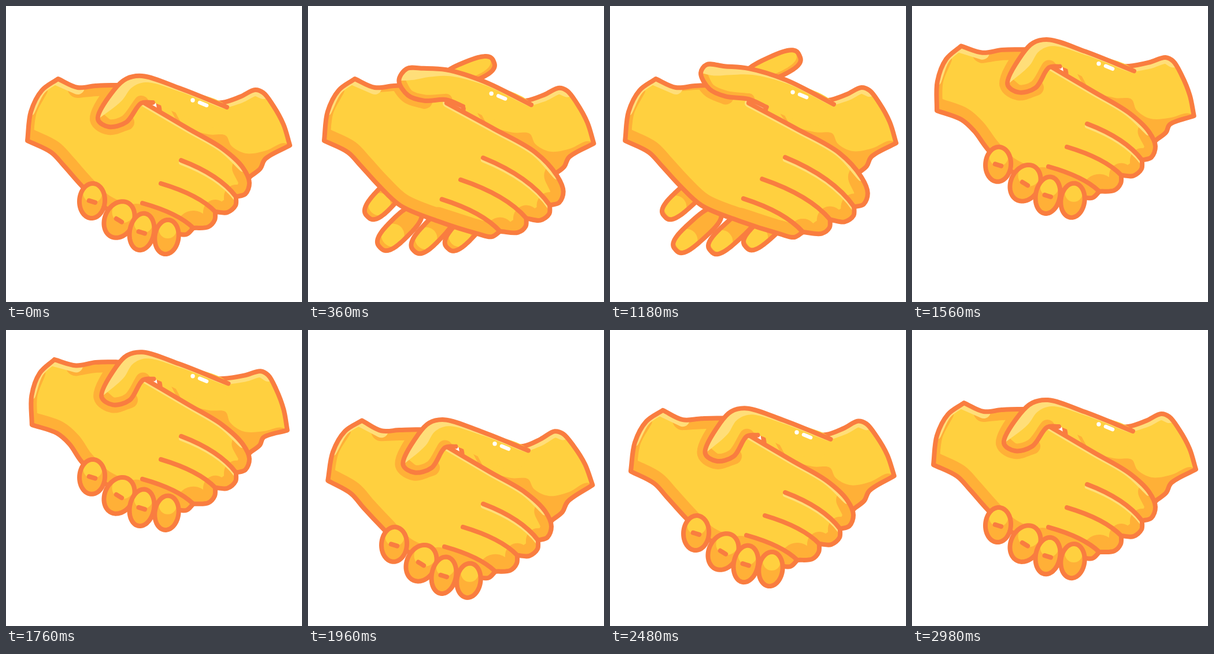
These frames come from a looping animation (512x512 px, 3 s). An HTML page with a canvas:

```html
<!DOCTYPE html>
<html lang="en">
<head>
<meta charset="utf-8">
<title>Handshake</title>
<style>
html, body { margin: 0; width: 100%; height: 100%; overflow: hidden; background: #fff; }
canvas { display: block; width: 100vw; height: 100vh; }
</style>
</head>
<body>
<canvas id="stage" width="512" height="512"></canvas>
<script>
const ctx = document.getElementById('stage').getContext('2d');
const LOOP = 3000;
const LINE = '#f97d40', FILL = '#ffd03f', SHADE = '#ffb037', PALE = '#ffde79';

// "x,y" pairs; "!" marks a corner.
const points = text => text.trim().split(/\s+/).map(p => {
  const [x, y] = p.replace('!', '').split(',').map(Number);
  return { x, y, corner: p.includes('!') };
});

// Outlines of the gripping hands; slideLeft and slideRight open them.
const LEFT = points(`90,126! 62,146 43,183 37,233! 78,253 100,276 130,310 165,345 225,372
  290,392 312,395 324,384! 350,382 361,370 362,356! 383,357 397,345 398,330! 414,325 421,306
  410,280 375,247 315,212 240,168! 248,142 188,137 155,138 124,141`);
const RIGHT = points(`264,171 265,184 244,202! 400,310 425,293 440,281 448,265 491,241!
  480,205 462,172 445,150 431,145 405,157 374,167 340,165 260,140`);
const PALM = points(`275,150 300,203 350,222 380,224 390,242 415,255 450,250 480,237
  500,245! 440,310 350,270`);

// Each row is one point when gripped, half open and open.
const THUMB = [
  '254,167 271,175 283,137',
  '234,168 240,161 262,123',
  '208,201 200,156 222,102',
  '178,209 172,143 203,84',
  '159,196 157,115 193,60',
  '187,145 167,101 205,36',
  '208,126 198,104 225,48',
  '235,121 240,108 255,69',
  '300,142 305,128 320,89',
  '382,175 387,170 403,134'
].map(points);
const BACK_THUMB = ['290,150 328,85 281,17', '230,150 235,128 242,105'].map(points);
const GLINT = points('323,163 316,149 324,106');

// Gripped tip and base, then the tip when stretched out.
const FINGERS = [
  '147,367 151,307 94,364',
  '182,399 210,340 113,422',
  '229,422 241,359 174,424',
  '274,429 282,370 235,417'
].map(points);
const CREASES = points('303,267 268,307 236,341');
const NOTCHES = [17, 14, 11];

const clamp = v => Math.max(0, Math.min(1, v));
const smooth = v => { v = clamp(v); return v * v * (3 - 2 * v); };
const wave = v => (1 - Math.cos(Math.PI * clamp(v))) / 2;
const move = (p, dx, dy) => ({ ...p, x: p.x + dx, y: p.y + dy });

function track(keys, t) {
  let i = 1;
  while (i < keys.length - 1 && t > keys[i][0]) i++;
  const [t0, a] = keys[i - 1], [t1, b] = keys[i];
  return a + (b - a) * wave((t - t0) / (t1 - t0));
}
const OPEN = [[0, 0], [170, 0], [600, 2], [1000, 2], [1360, 0], [LOOP, 0]];
const LIFT = [[0, 0], [160, 17], [360, 0], [1180, 0], [1350, 21], [1690, -102],
  [1985, 36], [2250, -103], [2475, 14], [LOOP, 0]];
const SQUEEZE = [[0, 0], [1300, 0], [1560, 1], [2480, 1], [LOOP, 0]];

let open, reach, spread, lift, bend, squeeze;

const mix = (a, b, c) => open < 1 ? a + (b - a) * open : b + (c - b) * (open - 1);
const blend = (a, b, c) => ({ x: mix(a.x, b.x, c.x), y: mix(a.y, b.y, c.y) });

function turn(p, cx, cy, angle) {
  const s = Math.sin(angle), c = Math.cos(angle), x = p.x - cx, y = p.y - cy;
  return { ...p, x: cx + x * c - y * s, y: cy + x * s + y * c };
}

// Shake: wrists bend against the lift, the grip presses in.
function flex(p) {
  const { x, y } = p;
  const left = smooth((190 - x) / 90) * smooth((310 - y) / 50);
  const right = smooth((x - 350) / 70) * smooth((290 - y) / 60);
  const press = squeeze * Math.exp(-((x - 185) ** 2 + (y - 195) ** 2) / 3600);
  let q = turn(p, 150, 180, -0.1 * bend * left);
  q = turn(q, 370, 215, 0.11 * bend * right);
  return move(q, 7 * press, 4 * press + lift);
}

function slideLeft(p) {
  const { x, y } = p;
  const out = smooth((x - 260) / 150), low = smooth((y - 200) / 100);
  const web = smooth((x - 125) / 45) * smooth((165 - y) / 20);
  const little = smooth((y - 340) / 50) * smooth((370 - x) / 60);
  const dx = reach * (25 * out - 11 * smooth((250 - x) / 150)) +
    spread * (25 * web - 24 * smooth((400 - x) / 300) - 14 * little);
  const dy = reach * 18 * out * low +
    spread * (15 * little - 28 * web - 19 - 8 * smooth((x - 150) / 200));
  return flex(move(p, dx, dy));
}

const slideRight = p => flex(move(p, 4 * reach + 14 * spread, -4 * reach - 34 * spread));
const morph = row => flex(blend(...row));

// Control point next to p, heading for q, with o on the other side.
function handle(o, p, q) {
  const d1 = Math.sqrt(Math.hypot(p.x - o.x, p.y - o.y));
  const d2 = Math.sqrt(Math.hypot(q.x - p.x, q.y - p.y));
  if (p.corner || d1 < 0.01) return { x: p.x + (q.x - p.x) / 3, y: p.y + (q.y - p.y) / 3 };
  const k = 2 * d1 * d1 + 3 * d1 * d2 + d2 * d2, n = 3 * d1 * (d1 + d2);
  const f = a => (d1 * d1 * q[a] - d2 * d2 * o[a] + k * p[a]) / n;
  return { x: f('x'), y: f('y') };
}

function curve(pts, closed = true) {
  const n = pts.length, path = new Path2D();
  const at = i => closed ? pts[(i + n) % n] : pts[Math.max(0, Math.min(n - 1, i))];
  path.moveTo(pts[0].x, pts[0].y);
  for (let i = 0; i < (closed ? n : n - 1); i++) {
    const p = at(i), q = at(i + 1);
    const a = handle(at(i - 1), p, q), b = handle(at(i + 2), q, p);
    path.bezierCurveTo(a.x, a.y, b.x, b.y, q.x, q.y);
  }
  if (closed) path.closePath();
  return path;
}

// Rounded lobe from base to tip, blunter when the hand is open.
function lobe(tip, base, width) {
  const path = new Path2D(), power = 2 / (2 + reach);
  const cx = (tip.x + base.x) / 2, cy = (tip.y + base.y) / 2;
  const ax = tip.x - cx, ay = tip.y - cy, half = Math.hypot(ax, ay);
  const soft = v => Math.sign(v) * Math.abs(v) ** power;
  for (let i = 0; i < 60; i++) {
    const a = i / 30 * Math.PI, u = soft(Math.cos(a)), v = soft(Math.sin(a)) * width / half;
    path.lineTo(cx + ax * u - ay * v, cy + ay * u + ax * v);
  }
  path.closePath();
  return path;
}

function fill(path, color) {
  ctx.fillStyle = color;
  ctx.fill(path);
}

function stroke(path, color = LINE, width = 8) {
  if (width <= 0) return;
  ctx.strokeStyle = color;
  ctx.lineWidth = width;
  ctx.stroke(path);
}

const trace = (pts, color, width) => stroke(curve(pts, false), color, width);

function body(path, color, shade) {
  fill(path, color);
  ctx.save();
  ctx.clip(path);
  shade();
  ctx.restore();
}

function disc(x, y, r, color) {
  const path = new Path2D();
  path.arc(x, y, Math.max(0, r), 0, 2 * Math.PI);
  fill(path, color);
}

function drawBackThumb() {
  const [tip, base] = BACK_THUMB.map(morph), width = mix(14, 19, 19);
  const path = lobe(tip, base, width);
  body(path, SHADE, () => fill(lobe(move(tip, -7, -5), move(base, -7, -5), width), FILL));
  stroke(path);
}

function drawRightHand() {
  const pts = RIGHT.map(slideRight), path = curve(pts);
  body(path, FILL, () => {
    fill(curve(PALM.map(slideRight)), SHADE);
    trace(pts.slice(10, 14), PALE, 22);
    ctx.globalAlpha = clamp((spread - 0.3) / 0.6);
    const shine = new Path2D();
    shine.ellipse(385, 183, 27, 8, -0.25, 0, 2 * Math.PI);
    shine.ellipse(425, 222, 13, 6, -0.3, 0, 2 * Math.PI);
    fill(shine, PALE);
  });
  stroke(path);
}

function drawFinger([grip, root, far], i) {
  const foot = move(far, 75, -68);
  const lifted = p => ({ x: p.x + (165 - p.x) * 0.1, y: p.y - 40 });
  const tip = morph([grip, far, lifted(far)]), base = morph([root, foot, lifted(foot)]);
  const width = mix(i === 1 ? 25 : 22 - i / 2, 18, 18);
  const path = lobe(tip, base, width);
  const along = k => [base.x + (tip.x - base.x) * k, base.y + (tip.y - base.y) * k];
  body(path, SHADE, () => disc(...along(mix(0.28, 0.76, 0.9)), width * mix(0.75, 1.1, 0), FILL));
  stroke(path);
  if (i < 3 && open < 0.35) {
    const [x, y] = along(0.52), tilt = 0.55 - 0.25 * Math.abs(i - 1);
    const dx = 5.5 * Math.cos(tilt), dy = 5.5 * Math.sin(tilt);
    trace([{ x: x - dx, y: y - dy }, { x: x + dx, y: y + dy }], LINE, 8);
  }
}

function drawLeftHand() {
  const pts = LEFT.map(slideLeft), path = curve(pts);
  const creases = CREASES.map((p, i) => {
    const a = move(slideLeft(p), -5 * reach, -8 * reach), b = pts[NOTCHES[i]];
    return { a, b, c: { x: a.x + 0.7 * (b.x - a.x), y: a.y + 0.4 * (b.y - a.y) } };
  });
  const crease = ({ a, b, c }, drop = 0) => {
    const line = new Path2D();
    line.moveTo(a.x, a.y + drop);
    line.quadraticCurveTo(c.x, c.y + drop, b.x, b.y + drop);
    return line;
  };
  body(path, FILL, () => {
    trace(pts.slice(1, 4), SHADE, 20);
    trace(pts.slice(3, 10), SHADE, 44);
    trace(pts.slice(8, 12), SHADE, mix(60, 46, 42));
    NOTCHES.forEach(i => trace(pts.slice(i - 2, i + 1), SHADE, mix(42, 46, 0)));
    trace(pts.slice(18, 21), SHADE, mix(38, 46, 0));
    trace(pts.slice(24), SHADE, mix(36, 14, 34));
    trace(THUMB.map(morph).slice(2, 7), SHADE, 28);
    trace([...pts.slice(-1), pts[0]], PALE, 24);
    trace(pts.slice(0, 3), PALE, 13);
    trace(pts.slice(20, 24), PALE, 14);
    [12, 15, 18].forEach(i => trace(pts.slice(i, i + 3), PALE, 20 * spread));
    stroke(crease(creases[0], 4), PALE, 8 * (1 - spread));
    creases.forEach(l => {
      const wedge = crease(l);
      wedge.quadraticCurveTo(l.c.x - 10, l.c.y + 16 * spread, l.a.x, l.a.y);
      if (spread) fill(wedge, SHADE);
    });
  });
  stroke(path);
  creases.forEach(l => stroke(crease(l)));
}

function drawThumb() {
  const edge = THUMB.map(morph), end = edge[9];
  const gleam = edge.slice(5).map((p, i) => {
    const k = 1 - i / 4;
    return move(p, 13 * k, 16 * k + 3);
  }).reverse();
  body(curve([...edge, move(end, -20, 35), move(edge[0], 45, 20)]), FILL, () => {
    trace(edge.slice(1, 5), SHADE, mix(26, 20, 8));
    fill(curve([{ ...edge[4], corner: true }, ...edge.slice(5), ...gleam]), PALE);
  });
  trace(edge, LINE, 8);
  const dot = morph(GLINT);
  disc(dot.x, dot.y, 3.7, '#fff');
  trace([move(dot, 12, 4), move(dot, 24, 9)], '#fff', 6.5);
}

function draw(t) {
  open = track(OPEN, t);
  reach = clamp(open);
  spread = clamp(open - 1);
  lift = track(LIFT, t);
  squeeze = track(SQUEEZE, t);
  bend = Math.min(1.3, -lift / 62);
  ctx.fillStyle = '#fff';
  ctx.fillRect(0, 0, 512, 512);
  ctx.lineCap = ctx.lineJoin = 'round';
  const curled = open < 0.4;
  drawBackThumb();
  drawRightHand();
  if (!curled) FINGERS.forEach(drawFinger);
  drawLeftHand();
  drawThumb();
  if (curled) FINGERS.forEach(drawFinger);
}

const start = performance.now();
function tick() {
  draw((performance.now() - start) % LOOP);
  requestAnimationFrame(tick);
}
tick();
</script>
</body>
</html>
```
